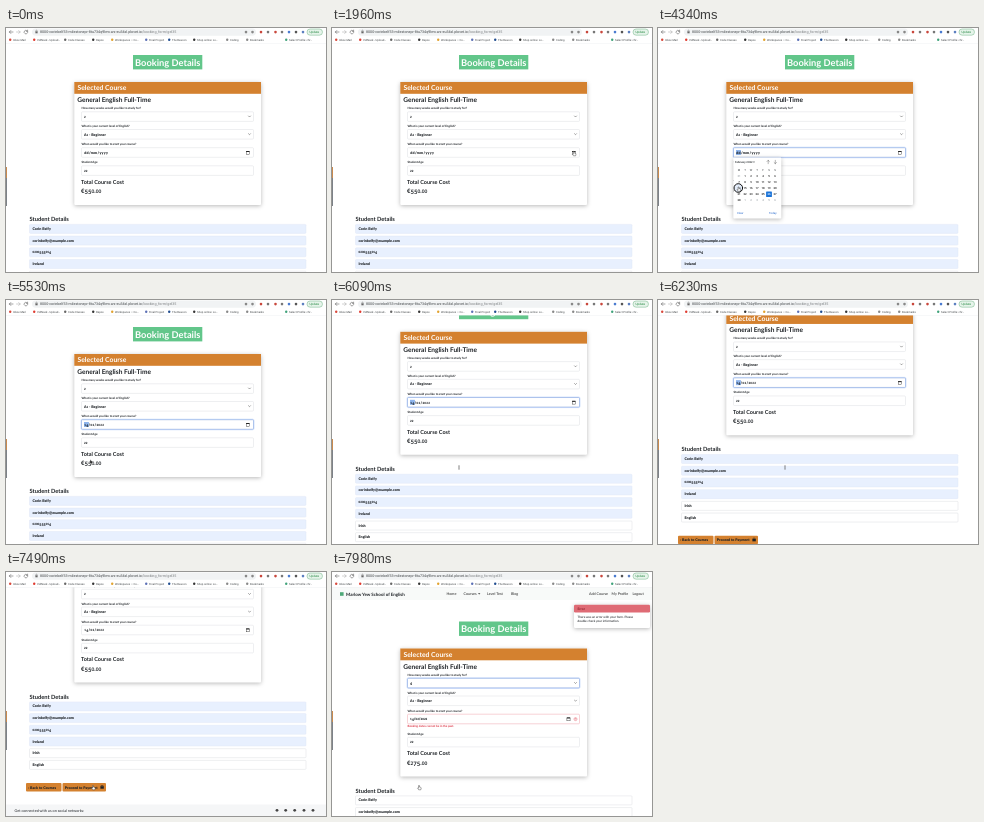
Write an HTML page that moves like this. It is 320 px wide and 244 px high and loops after 8000 ms.

```html
<!DOCTYPE html>
<html lang="en">
<head>
<meta charset="utf-8">
<title>Booking Details</title>
<style>
html, body { margin: 0; width: 100%; height: 100%; overflow: hidden; background: #fff; }
svg { display: block; width: 320px; height: 244px; }
text { font-family: Lato, "Open Sans", sans-serif; font-weight: 700; fill: #1d2125; text-rendering: geometricPrecision; white-space: pre; }
.ui { font-family: Roboto, Inter, sans-serif; font-weight: 400; fill: #3c4043; }
.strong { font-weight: 900; }
.small { font-size: .8em; }
.low { baseline-shift: -.15em; }
.shadow { filter: drop-shadow(0 1px 2px rgba(0, 0, 0, .28)); }
</style>
</head>
<body>
<svg id="stage" viewBox="0 0 320 244" xmlns="http://www.w3.org/2000/svg"></svg>
<script>
const LOOP = 8000;
const ORANGE = '#d4812f', BLUE = '#8aa9e6', RED = '#dc3545', GRAY = '#d3d7dc';

const rect = (x, y, w, h, fill, more = '') =>
  `<rect x="${x}" y="${y}" width="${w}" height="${h}" fill="${fill}" ${more}/>`;
const text = (x, y, size, str, more = '') =>
  `<text x="${x}" y="${y}" font-size="${size}" ${more}>${str}</text>`;
const dot = (x, y, r, fill) => `<circle cx="${x}" cy="${y}" r="${r}" fill="${fill}"/>`;
const line = (d, color = '#444', width = .6) =>
  `<path d="${d}" fill="none" stroke="${color}" stroke-width="${width}" stroke-linecap="round"/>`;

// Old-style figures: 0-2 at x-height, 3 4 5 7 9 below the baseline.
const oldStyle = str => str.replace(/[0-57]|9/g, d =>
  `<tspan class="${d < 3 ? 'small' : 'low'}">${d}</tspan>`);

const glow = (y, id = '') => `<g ${id}>` +
  rect(75, y - .5, 173, 10.6, 'none', 'rx="1.3" stroke="#d6e4fc" stroke-width="1"') +
  rect(75.5, y, 172, 9.6, 'none', `rx="1" stroke="${BLUE}" stroke-width=".6"`) + '</g>';

const field = (y, value, border = GRAY) =>
  rect(75.5, y, 172, 9.6, '#fff', `rx="1" stroke="${border}" stroke-width=".4"`) +
  text(78, y + 6, 3.6, oldStyle(value), 'class="strong"');

const chevron = y => line(`M242.5 ${y - .5}l1 1l1-1`, '#444', .5);

const calendarIcon = (x, y) =>
  rect(x - 1.6, y - 1.3, 3.2, 3, 'none', 'stroke="#222" stroke-width=".4"') +
  rect(x - 1.6, y - 1.6, 3.2, 1, '#222');

function formPage(invalid) {
  const push = invalid ? 5 : 0;
  const label = (y, str) => text(75.5, y, 2.95, str);
  const details = ['Corin Belfy', 'corinbelfy@example.com', oldStyle('0200555014'), 'Ireland', 'Irish', 'English'];
  const rows = details.map((value, i) => {
    const y = 196.4 + 11.7 * i, filled = !invalid && i < 4;
    return rect(23.5, y, 276.5, 9, filled ? '#e8f0fe' : '#fff',
      `rx=".8" stroke="${filled ? '#dbe4f4' : GRAY}" stroke-width=".4"`) +
      text(26.5, y + 5.5, 3.65, value, 'class="strong"');
  }).join('');

  const top = rect(127, 27, 69.3, 14.4, '#62c68a') +
    text(161.7, 37.5, 9.3, 'Booking Details', 'text-anchor="middle" style="fill:#fff"') +
    rect(68.3, 54, 186.7, 123 + push, '#fff', 'class="shadow" rx="1"') +
    rect(68.3, 54, 186.7, 11.8, ORANGE) +
    text(71.5, 62.4, 6.8, 'Selected Course', 'style="fill:#fff"') +
    text(71.3, 74.2, 6.55, 'General English Full-Time') +
    label(81, 'How many weeks would you like to study for?') +
    field(83.8, invalid ? '4' : '2') + chevron(88.5) +
    label(99, 'What is your current level of English?') +
    field(101.5, 'A1 - Beginner') + chevron(106.2) +
    label(117.2, 'When would you like to start your course?');

  const date = invalid
    ? field(119.7, '14/02/2022', '#eb8f98') + glow(83.8) + calendarIcon(236.5, 124.6) +
      `<circle cx="243.5" cy="124.6" r="1.5" fill="none" stroke="${RED}" stroke-width=".4"/>` +
      line('M243.5 123.9v.8', RED, .4) +
      text(75.5, 132.6, 2.9, 'Booking dates cannot be in the past.', `style="fill:${RED}"`)
    : field(119.7, '') + glow(119.7, 'id="focus"') +
      rect(78, 122, 4.9, 5, '#8db4ec', 'id="segment"') +
      text(78.3, 125.8, 3.6, '<tspan id="day"></tspan><tspan id="rest"></tspan>',
        'class="strong" letter-spacing=".25"') +
      calendarIcon(241.8, 124.6);

  const bottom = `<g transform="translate(0 ${push})">` +
    label(135.2, 'Student Age') + field(137.8, '22') +
    text(75, 155.8, 5.5, 'Total Course Cost') +
    text(75, 165, 6, oldStyle(invalid ? '€275.00' : '€550.00')) +
    text(23.5, 193, 5.75, 'Student Details') + rows +
    rect(20, 277.5, 35.5, 8.4, ORANGE, 'rx="1"') + text(22.2, 283, 3.6, '‹ Back to Courses', 'class="strong"') +
    rect(56.5, 277.5, 43.5, 8.4, ORANGE, 'rx="1"') + text(58.8, 283, 3.6, 'Proceed to Payment', 'class="strong"') +
    rect(94.4, 280.8, 3.4, 2.4, '#1d2125') + line('M95.1 280.8v-.8h2v.8', '#1d2125', .5) +
    rect(0, 299, 320, 20, '#f5f6f7') +
    text(8.5, 306, 3.75, 'Get connected with us on social networks:', 'style="font-weight:400"') +
    [271, 279.7, 288.7, 298, 307].map(x => dot(x, 304.8, 1.4, '#444')).join('') + '</g>';

  return top + date + bottom;
}

function navBar() {
  const item = (x, str) => text(x, 23.2, 3.7, str, 'style="font-weight:500;fill:#333"');
  return rect(0, 15, 320, 13, '#f8faf9') +
    rect(8, 20.2, 3.6, 3.6, '#4fa878') + text(14, 23.6, 4.45, 'Marlow Yew School of English') +
    item(114.5, 'Home') + item(131.5, 'Courses') + `<path d="M146 21.2h2.4l-1.2 1.4z" fill="#333"/>` +
    item(155, 'Level Test') + item(179, 'Blog') +
    item(257, 'Add Course') + item(279.5, 'My Profile') + item(300.5, 'Logout');
}

function toast() {
  const body = (y, str) => text(245.5, y, 3.05, str, 'style="font-weight:500"');
  return rect(242, 32.8, 76, 23.2, '#fff', 'rx="1.2" class="shadow"') +
    rect(242, 32.8, 76, 7.6, '#df6b75', 'rx="1.2"') +
    text(245.5, 37.8, 3.3, 'Error', 'style="fill:#8d1f2a"') +
    body(45.6, 'There was an error with your form. Please') + body(50.2, 'double check your information.');
}

function datePicker() {
  const colX = c => 81 + 6 * c, mid = 'text-anchor="middle" class="ui"';
  let out = rect(75.3, 129.5, 48, 61, '#fff', 'rx="1" class="shadow"') +
    text(77, 134.8, 2.7, 'February 2022 ▾', 'class="ui" style="font-weight:700"') +
    line('M110.2 135.7v-3.4m-1.2 1.2l1.2-1.2l1.2 1.2M117.3 132.3v3.4m-1.2-1.2l1.2 1.2l1.2-1.2', '#444', .4) +
    [...'MTWTFSS'].map((d, c) => text(colX(c), 143, 2.8, d, mid)).join('');
  for (let i = 0; i < 35; i++) {
    const inMonth = i > 0 && i < 29, today = i === 26;
    const x = colX(i % 7), y = 148 + 6.1 * Math.floor(i / 7);
    const day = i === 0 ? 31 : inMonth ? i : i - 28;
    const color = today ? '#fff' : inMonth ? '#111' : '#9aa0a6';
    if (today) out += rect(x - 2.9, y - 2.8, 5.8, 5.6, '#1a73d8', 'rx=".5"');
    out += text(x, y + 1, 2.8, day, `${mid} style="fill:${color};font-weight:500"`);
  }
  const action = (x, str) => text(x, 185.6, 2.8, str, 'class="ui" style="fill:#1a5fc8"');
  return out + action(79, 'Clear') + action(111, 'Today');
}

function browserBar() {
  const marks = [
    [3, '#d9483b', 'Inbox Mail'], [27, '#e03a2f', 'VidNook - Upload…'], [58, '#666', 'Code Classes'],
    [86, '#333', 'Repos'], [105, '#e2a32f', 'Workspaces — Co…'], [139, '#5b6fb5', 'Final Project'],
    [162, '#1f4c8f', 'The Beacon'], [187, '#333', 'Shop online: Lo…'], [220, '#888', 'Coding'],
    [240, '#888', 'Bookmarks'], [279, '#3fa27a', 'Select Profile: chr…']
  ];
  return rect(0, 0, 320, 15.2, '#fff') +
    line('M7 4H3.3m1.5-1.5L3.3 4l1.5 1.5', '#555', .55) +
    line('M10.5 4h3.7m-1.5-1.5L14.2 4l-1.5 1.5', '#aaa', .55) +
    line('M21.6 3.3a1.8 1.8 0 1 0 .1 1.3m-.1-2.5v1.3h-1.3', '#555', .55) +
    rect(26, .4, 224, 7.4, '#f1f3f4', 'rx="3.7"') +
    rect(29.4, 3.4, 2.2, 1.9, '#666') + line('M29.8 3.4v-.6a.7 .7 0 0 1 1.4 0v.6', '#666', .4) +
    text(34, 5.3, 3.65, '8000-corinbelf33-milestonepr-8tu734q9lmv.ws-eu34xl.plovet.io' +
      '<tspan fill-opacity=".65">/booking_form/gel35</tspan>', 'class="ui"') +
    [['#888', 240], ['#888', 246.5], ['#c9473c', 255], ['#777', 262], ['#c9473c', 269.5],
     ['#777', 276], ['#4a7bd0', 283], ['#555', 290], ['#5c7fc0', 297]]
      .map(([color, x]) => dot(x, 4.1, 1.3, color)).join('') +
    rect(301, 1, 15.5, 6.2, '#e6f4ea', 'rx="3.1" stroke="#4fa36a" stroke-width=".4"') +
    text(303.6, 5.2, 3, 'Update', 'class="ui" style="fill:#188038"') +
    marks.map(([x, color, str]) => dot(x + 1.2, 11.7, 1.2, color) +
      text(x + 4, 12.7, 2.75, str, 'class="ui"')).join('') +
    rect(0, 15, 320, .3, '#e4e6e9');
}

const stage = document.getElementById('stage');
stage.innerHTML =
  rect(0, 0, 320, 244, '#fff') +
  `<g id="page">${formPage(false)}</g>` +
  `<g id="errorPage"><g transform="translate(0 22.5)">${formPage(true)}</g>${navBar()}<g id="toast">${toast()}</g></g>` +
  `<g id="picker">${datePicker()}</g>` +
  browserBar() +
  rect(0, 139, 1, 11, '#c98a4e') + rect(0, 150, 1, 28, '#7d8288') +
  `<circle id="ring" cx="80.3" cy="160" r="4.3" fill="#b9cff0" fill-opacity=".4" stroke="#111" stroke-width="1"/>` +
  `<g id="cursor" stroke-width=".4">
    <path id="arrow" fill="#111" stroke="#fff" d="M0 0v4.6l1.1-1l.8 1.8l.8-.4l-.8-1.7h1.5z"/>
    <path id="hand" fill="#fff" stroke="#222" d="M-.4 0q.4-.5.8 0v1.5l1.4.4q.5.2.4.8l-.4 1.6h-2.1l-1.2-1.6q.1-.7 1.1 0z"/>
    <path id="beam" fill="none" stroke="#555" d="M-.7-1.4q.7 0 .7.5v2.8q0 .5-.7.5M.7-1.4q-.7 0-.7.5v2.8q0 .5.7.5"/>
  </g>`;

const parts = Object.fromEntries([...stage.querySelectorAll('[id]')].map(el => [el.id, el]));
const show = (el, on) => { el.style.display = on ? '' : 'none'; };
const progress = (t, from, to) => Math.min(1, Math.max(0, (t - from) / (to - from)));
const smooth = p => p * p * (3 - 2 * p);

// time, x, y
const cursorPath = [
  [1330, 300, 250], [1880, 241.8, 123.5], [2840, 241.8, 123.5], [3640, 93, 156],
  [3920, 87, 158.5], [4130, 80.5, 159], [4970, 80.5, 159], [5250, 84, 159.5],
  [5530, 84, 159.5], [5800, 127, 167], [6650, 127, 167], [7300, 87, 213.5]
];

function cursorAt(t) {
  const next = cursorPath.findIndex(([time]) => time > t);
  const i = next < 0 ? cursorPath.length - 1 : Math.max(1, next);
  const [t0, x0, y0] = cursorPath[i - 1], [t1, x1, y1] = cursorPath[i];
  const p = smooth(progress(t, t0, t1));
  return [x0 + (x1 - x0) * p, y0 + (y1 - y0) * p];
}

function cursorShape(t) {
  if (t < 1330) return '';
  if (t > 5750 && t < 6800) return 'beam';
  const pointing = (t > 1800 && t < 2900) || (t > 3500 && t < 5000) || t > 7200;
  return pointing ? 'hand' : 'arrow';
}

function render(t) {
  const failed = t >= 7700, chosen = t >= 4970;
  const focused = t >= 2380 && t < 7210;

  const scroll = 66.5 * smooth(progress(t, 5820, 6520));
  parts.page.setAttribute('transform', `translate(0 ${-scroll})`);
  show(parts.page, !failed);
  show(parts.errorPage, failed);
  parts.toast.setAttribute('opacity', progress(t, 7740, 7950));

  show(parts.focus, focused);
  show(parts.segment, focused);
  parts.day.innerHTML = chosen ? oldStyle('14') : 'dd';
  parts.rest.innerHTML = chosen ? oldStyle('/02/2022') : '/mm/yyyy';
  show(parts.picker, t >= 2450 && t < 4970);
  show(parts.ring, t >= 4340 && t < 4970);

  const [x, y] = cursorAt(t), shape = cursorShape(t);
  parts.cursor.setAttribute('transform', `translate(${x} ${y})`);
  for (const name of ['arrow', 'hand', 'beam']) show(parts[name], name === shape);
}

const start = performance.now();
function tick() {
  render((performance.now() - start) % LOOP);
  requestAnimationFrame(tick);
}
tick();
</script>
</body>
</html>
```
